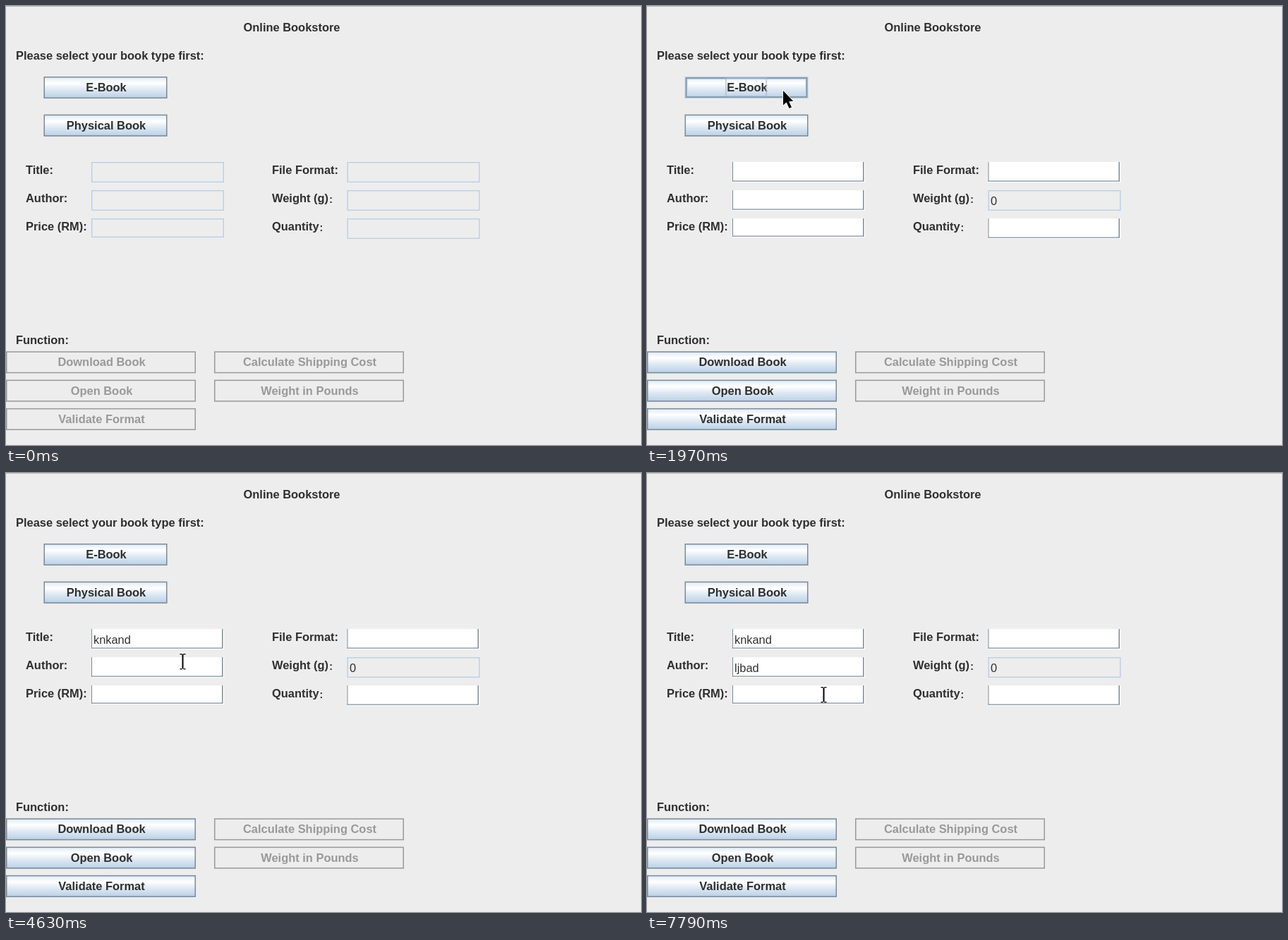
An HTML page with a canvas that plays this animation: 900x622 px, repeating every 8 s.

```html
<!DOCTYPE html>
<html lang="en">
<head>
<meta charset="utf-8">
<title>Online Bookstore</title>
<style>
html, body { margin: 0; width: 100%; height: 100%; overflow: hidden; background: #ededed; }
canvas { display: block; }
</style>
</head>
<body>
<canvas id="stage" width="900" height="622"></canvas>
<script>
const ctx = document.getElementById('stage').getContext('2d');
const LOOP = 8000, STEP = 70;
const PRESS = 1780, RELEASE = 1970;
const BG = '#ededed', INK = '#2f2f2f', STEEL = '#7a8a99', SKY = '#b8cfe5', GREY = '#999';
const FAMILY = '"Liberation Sans", Arial, sans-serif';
const BOLD = 'bold 16.45px ' + FAMILY, PLAIN = '16.4px ' + FAMILY;

// pointer keys: time, x, y
const path = [
  [390, 700, 506], [460, 552, 418], [530, 440, 372], [600, 398, 352], [670, 360, 335],
  [810, 283, 268], [1170, 196, 125], [1310, 193, 120], [1970, 193, 120], [2240, 248, 250],
  [2710, 256, 237], [2780, 255, 236], [4160, 255, 236], [4450, 252, 252], [4630, 250.5, 267],
  [4770, 250.5, 272], [6300, 250.5, 272], [6990, 250.5, 314]
];
// click highlights: start, end, x, y
const clicks = [[PRESS, RELEASE, 193, 119], [2980, 3210, 255, 236], [5040, 5310, 250, 271], [7320, 7520, 250, 313]];

// typed fields: caret is visible during the listed spans
const fields = [
  { y: 221, h: 29, text: 'knkand', from: 3210, to: 3680, caret: [[2980, 4160], [4660, 5040]] },
  { y: 261, h: 29, text: 'ljbad', from: 5510, to: 5840, caret: [[5040, 6300], [6800, 7320]] },
  { y: 301, h: 27, text: '', from: LOOP, to: LOOP, caret: [[7320, 7790]] }
];

const within = (t, [a, b]) => t >= a && t < b;

function rect(x, y, w, h, color) {
  ctx.fillStyle = color;
  ctx.fillRect(x, y, w, h);
}

function text(s, x, y, font = BOLD, color = INK, align = 'left') {
  ctx.font = font;
  ctx.fillStyle = color;
  ctx.textAlign = align;
  ctx.fillText(s, x, y);
}

function outline(x, y, w, h, color, line = 1.4) {
  ctx.strokeStyle = color;
  ctx.lineWidth = line;
  ctx.strokeRect(x + line / 2, y + line / 2, w - line, h - line);
}

function button(label, x, y, w, state) {
  const h = 31;
  if (state === 'pressed') {
    rect(x, y, w, h, SKY);
    outline(x, y, w, h, STEEL);
    rect(x, y, w, 2.6, STEEL);
    rect(x, y, 2.6, h, STEEL);
  } else if (state === 'disabled') {
    outline(x, y, w, h, GREY, 1.5);
  } else {
    const shade = ctx.createLinearGradient(0, y, 0, y + h);
    [[0, '#dde8f3'], [.3, '#fff'], [.6, '#dde8f3'], [1, SKY]].forEach(s => shade.addColorStop(...s));
    rect(x, y, w, h, shade);
    if (state === 'hover') {
      outline(x, y, w, h, SKY, 4);
      outline(x + 1.3, y + 1.3, w - 2.6, h - 2.6, STEEL);
    } else {
      outline(x, y, w, h, STEEL, 1.5);
    }
  }
  text(label, x + w / 2 + 1, y + 21, BOLD, state === 'disabled' ? GREY : INK, 'center');
}

function field(x, y, h, enabled) {
  if (!enabled) return outline(x, y, 188, h, SKY);
  rect(x, y, 188, h, '#fff');
  rect(x, y, 1, h - 1.5, STEEL);
  rect(x, y + h - 2.5, 186, 1.2, STEEL);
  rect(x + 185, y, 1.5, h - 1.5, STEEL);
}

function pointerAt(t) {
  if (t < path[0][0]) return null;
  let i = path.length - 1;
  while (path[i][0] > t) i--;
  const [t0, x0, y0] = path[i];
  if (i === path.length - 1) return { x: x0, y: y0 };
  const [t1, x1, y1] = path[i + 1];
  const u = Math.floor((t - t0) / STEP) * STEP / (t1 - t0);
  return { x: x0 + (x1 - x0) * u, y: y0 + (y1 - y0) * u };
}

function arrow(x, y) {
  ctx.beginPath();
  [[0, 0], [0, 20.5], [4.6, 16.4], [8.6, 25], [12, 23.4], [8.2, 15.2], [14.2, 14.8]]
    .forEach(([dx, dy]) => ctx.lineTo(x + dx, y + dy));
  ctx.closePath();
  ctx.strokeStyle = '#fff';
  ctx.lineWidth = 1.6;
  ctx.stroke();
  ctx.fillStyle = '#000';
  ctx.fill();
}

function beam(x, y) {
  rect(x - 1, y - 10, 2, 20, '#000');
  for (const dy of [-11, 10]) {
    rect(x - 4, y + dy, 3.3, 1.3, '#000');
    rect(x + .7, y + dy, 3.3, 1.3, '#000');
  }
}

function typed(f, t) {
  if (t < f.from) return '';
  const gap = (f.to - f.from) / (f.text.length - 1);
  return f.text.slice(0, Math.floor((t - f.from) / gap + 1.001));
}

function draw(t) {
  const open = t >= RELEASE, p = pointerAt(t);
  const over = y => p && p.x > 53 && p.x < 228 && p.y >= y && p.y < y + 31;
  const typeState = y => over(y) ? 'hover' : 'normal';

  rect(0, 0, 900, 622, BG);
  rect(0, 0, 900, 1, '#b8b8b8');
  text('Online Bookstore', 336.5, 36);
  text('Please select your book type first:', 14, 76);
  text('Function:', 14, 479);
  ['Title:', 'Author:', 'Price (RM):'].forEach((s, i) => text(s, 28, 237.5 + i * 40.3));
  ['File Format:', 'Weight (g)', 'Quantity'].forEach((s, i) => text(s, 377, 237.5 + i * 40.3));
  const small = 'bold 14px ' + FAMILY;
  text(':', 458.2, 278.5, small);
  text(':', 444.5, 319, small);

  button('E-Book', 53.5, 100, 175, within(t, [PRESS, RELEASE]) ? 'pressed' : typeState(100));
  if (within(t, [PRESS, 2980])) outline(111.3, 101.5, 58.5, 27, '#a3b8cc', 1.2);
  button('Physical Book', 53.5, 153.7, 175, typeState(154));

  const ebook = open ? 'normal' : 'disabled';
  ['Download Book', 'Open Book', 'Validate Format'].forEach((s, i) => button(s, 0, 489.3 + i * 40.3, 269, ebook));
  ['Calculate Shipping Cost', 'Weight in Pounds'].forEach((s, i) => button(s, 295, 489.3 + i * 40.3, 269, 'disabled'));

  fields.forEach((f, i) => {
    field(121, f.y, f.h, open);
    field(483.5, f.y, 29, open && i !== 1);
    const s = typed(f, t);
    text(s, 124, f.y + 21, PLAIN);
    if (f.caret.some(span => within(t, span))) {
      rect(Math.round(123.6 + ctx.measureText(s).width), f.y + 3, 1, f.h - 6, INK);
    }
  });
  if (open) text('0', 487, 282, PLAIN);

  if (p) {
    const inField = p.x > 121 && p.x < 309 && fields.some(f => p.y >= f.y && p.y < f.y + f.h + 1);
    (open && inField ? beam : arrow)(p.x, p.y);
  }
  for (const [a, b, x, y] of clicks) {
    if (!within(t, [a, b])) continue;
    ctx.fillStyle = 'rgba(240, 240, 50, .6)';
    ctx.beginPath();
    ctx.arc(x, y, 16, 0, 2 * Math.PI);
    ctx.fill();
  }
}

function tick() {
  draw(performance.now() % LOOP);
  requestAnimationFrame(tick);
}
tick();
</script>
</body>
</html>
```
